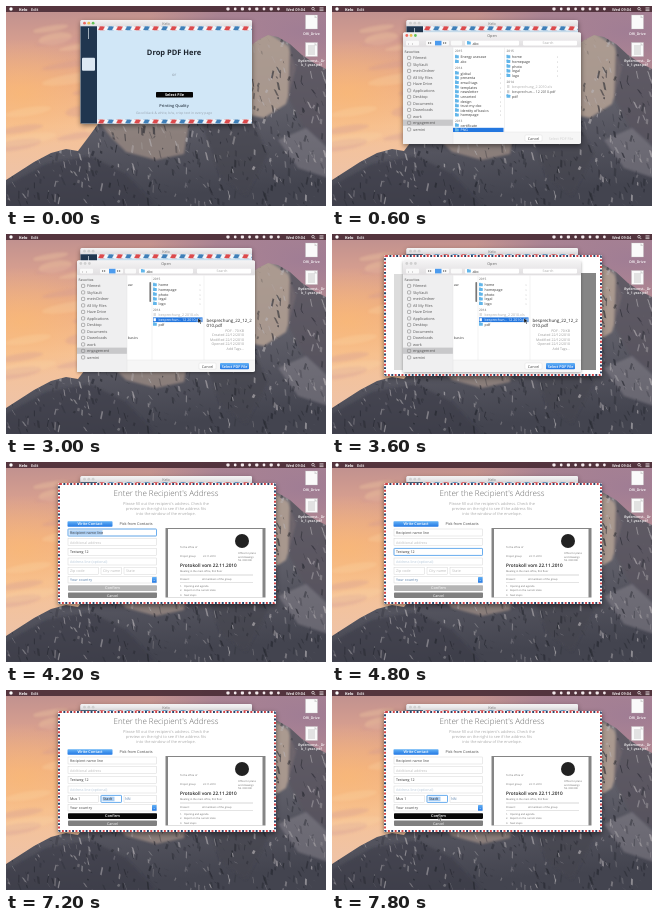
An HTML page for the animation above (8000 ms loop, 320 by 200 pixels).

```html
<!DOCTYPE html>
<html lang="en">
<head>
<meta charset="utf-8">
<title>Letter upload</title>
<style>
html, body { margin: 0; width: 100%; height: 100%; overflow: hidden; background: #a89ba2; }
svg { display: block; width: 100vw; height: 100vh; }
text { font-family: "Open Sans", "Noto Sans", sans-serif; text-rendering: geometricPrecision; white-space: pre; }
</style>
</head>
<body>
<svg id="stage" viewBox="0 0 320 200" xmlns="http://www.w3.org/2000/svg"></svg>
<script>
const LOOP = 8000;
const ACTIVE = ['#f0685e', '#f0bd4e', '#65c358'];
const IDLE = ['#d0d0d0', '#d0d0d0', '#d0d0d0'];
const stage = document.getElementById('stage');

// Drawing helpers
const rect = (x, y, w, h, fill, more = '') =>
  `<rect x="${x}" y="${y}" width="${w}" height="${h}" fill="${fill}" ${more}/>`;
const text = (x, y, size, str, fill = '#333', more = '') =>
  `<text x="${x}" y="${y}" font-size="${size}" fill="${fill}" ${more}>${str}</text>`;
const mid = (x, y, size, str, fill, more = '') =>
  text(x, y, size, str, fill, `text-anchor="middle" ${more}`);
const dot = (x, y, r, fill) => `<circle cx="${x}" cy="${y}" r="${r}" fill="${fill}"/>`;
const poly = (points, fill, more = '') => `<polygon points="${points}" fill="${fill}" ${more}/>`;
const line = (x1, y1, x2, y2, color, w = 0.4) =>
  `<path d="M${x1} ${y1}L${x2} ${y2}" stroke="${color}" stroke-width="${w}" fill="none"/>`;
const during = (from, to, body) => `<g data-from="${from}" data-to="${to}">${body}</g>`;
const lights = (x, y, colors) => colors.map((c, i) => dot(x + i * 4.3, y, 1.4, c)).join('');
const folder = (x, y) => rect(x, y - 3, 3.8, 3, '#62b6ea', 'rx=".4"') + rect(x, y - 3.5, 1.8, 1, '#62b6ea');
const pointer = (x, y) => `<path transform="translate(${x} ${y})" d="M0 0v5l1.3-1.2 1 2.2.8-.5-.9-2 1.6-.1z"
  fill="#111" stroke="#fff" stroke-width=".3"/>`;

function random(seed) {
  return () => (seed = (seed * 16807) % 2147483647) / 2147483647;
}

const defs = `<defs>
  <linearGradient id="sky" x2="0" y2="1">
    <stop offset="0" stop-color="#bd8f8f"/><stop offset=".2" stop-color="#d9a08f"/>
    <stop offset=".4" stop-color="#efb088"/><stop offset=".6" stop-color="#f6c296"/>
    <stop offset=".85" stop-color="#efc3a6"/></linearGradient>
  <radialGradient id="glow"><stop stop-color="#fbb971" stop-opacity=".65"/>
    <stop offset="1" stop-color="#fbb971" stop-opacity="0"/></radialGradient>
  <radialGradient id="mauve"><stop stop-color="#a07d94"/>
    <stop offset=".6" stop-color="#a07d94" stop-opacity=".75"/>
    <stop offset="1" stop-color="#a07d94" stop-opacity="0"/></radialGradient>
  <linearGradient id="rock" x2=".15" y2="1">
    <stop offset="0" stop-color="#8d8486"/><stop offset=".45" stop-color="#66656f"/>
    <stop offset="1" stop-color="#43444f"/></linearGradient>
  <linearGradient id="bar" x2="0" y2="1"><stop stop-color="#f4f3f4"/><stop offset="1" stop-color="#e0dee0"/></linearGradient>
  <linearGradient id="blue" x2="0" y2="1"><stop stop-color="#64b2f6"/><stop offset="1" stop-color="#2277e4"/></linearGradient>
  <pattern id="mail" width="18" height="4" patternUnits="userSpaceOnUse" x="92" y="20.3">
    <path d="M2 0h5l-2 4h-5z" fill="#dc4a4c"/><path d="M11 0h5l-2 4h-5z" fill="#3f7fb8"/></pattern>
  <clipPath id="cliff"><path d="M0 174L14 165 28 156 45 147 60 143 72 145 84 129 92 118 150 85 210 58 243 41
    252 34 262 29 272 31 284 38 296 49 308 57 320 63V200H0z"/></clipPath>
  <filter id="soft"><feGaussianBlur stdDeviation="1.1"/></filter>
  <filter id="shade" x="-15%" y="-15%" width="130%" height="130%"><feDropShadow dx="0" dy="2" stdDeviation="2.5" flood-opacity=".45"/></filter>
  <filter id="faint" x="-15%" y="-15%" width="130%" height="130%"><feDropShadow dx="0" dy="1" stdDeviation="1.5" flood-opacity=".35"/></filter>
</defs>`;

function wallpaper() {
  const rnd = random(41);
  let cracks = '';
  for (let i = 0; i < 850; i++) {
    const x = rnd() * 322, y = 30 + rnd() * 172;
    const h = 2 + rnd() * 7, w = 0.6 + rnd() * 1.8, lean = (rnd() - 0.35) * 5;
    const color = rnd() > 0.55 ? '#b9b5b8' : '#22242c';
    cracks += poly(`${x},${y} ${x + w},${y + 1} ${x + w + lean},${y + h} ${x + lean},${y + h - 1}`,
      color, `opacity="${0.2 + rnd() * 0.45}"`);
  }
  let clouds = '';
  for (let i = 0; i < 14; i++) {
    clouds += `<ellipse cx="${rnd() * 95}" cy="${18 + rnd() * 120}" rx="${14 + rnd() * 23}" ry="${2 + rnd() * 4}"
      fill="${i % 2 ? '#fcd6a6' : '#cb9492'}" opacity=".28" transform="rotate(-9 40 80)"/>`;
  }
  return rect(0, 0, 320, 200, 'url(#sky)')
    + '<ellipse cx="15" cy="88" rx="85" ry="55" fill="url(#glow)"/>'
    + '<ellipse cx="300" cy="25" rx="160" ry="65" fill="url(#mauve)"/>'
    + `<g filter="url(#soft)">${clouds}</g>`
    + '<g clip-path="url(#cliff)">' + rect(0, 20, 320, 180, 'url(#rock)')
    + '<g filter="url(#soft)">'
    + poly('240,40 262,27 282,40 290,62 280,98 258,112 238,108', '#b4a194', 'opacity=".85"')
    + poly('284,36 322,60 322,140 296,120 282,92', '#5a5560', 'opacity=".75"')
    + poly('92,114 184,112 178,148 150,154 120,146 104,130', '#998a83', 'opacity=".8"')
    + poly('195,116 245,112 262,148 240,190 214,170', '#45464f', 'opacity=".65"')
    + poly('0,180 40,158 84,150 120,168 150,200 0,200', '#3b3d49', 'opacity=".6"')
    + poly('272,134 300,122 322,142 322,172 292,162', '#85818a', 'opacity=".55"')
    + `</g>${cracks}</g>`;
}

function desktop() {
  const paper = y => rect(299.5, y, 12, 14, '#fafafa', 'stroke="#bbb" stroke-width=".3"')
    + poly(`308.5,${y} 311.5,${y + 3} 308.5,${y + 3}`, '#d5d5d5');
  let rows = '';
  for (let i = 0; i < 5; i++) rows += line(302, 40 + i * 2, 309, 40 + i * 2, '#999', 0.5);
  const label = (y, s) => mid(305.5, y, 3.5, s, '#fff', 'font-weight="600"');
  const menu = (x, s, weight) => text(x, 4.5, 3.9, s, '#fff', `font-weight="${weight}"`);
  let status = '';
  for (let i = 0; i < 8; i++) {
    const x = 222 + i * 7.2;
    status += i % 2 ? dot(x, 3, 1.4, '#f3e9ec') : rect(x - 1.6, 1.6, 3.2, 2.8, '#f3e9ec', 'rx=".8"');
  }
  return rect(0, 0, 320, 6, '#4d2f39', 'opacity=".93"') + dot(5, 3, 1.7, '#fff')
    + menu(13, 'Kelo', 700) + menu(25, 'Edit', 600) + status + menu(280, 'Wed 09:04', 600)
    + '<circle cx="307" cy="2.7" r="1.3" fill="none" stroke="#fff" stroke-width=".6"/>' + line(308, 3.7, 309.3, 5, '#fff', 0.6)
    + [1.8, 3.2, 4.6].map(y => line(313.5, y, 317.5, y, '#fff', 0.6)).join('')
    + paper(9) + label(28.5, 'DRI_Drive') + paper(36.5) + rows
    + label(56, 'Bydemonst.._Dr') + label(60.3, 'k_1.year.pdf');
}

function appWindow() {
  const stripes = rect(91, 20.3, 155, 4, '#f3f5f8') + rect(91, 20.3, 155, 4, 'url(#mail)');
  return `<g filter="url(#shade)">${rect(74.5, 14, 171.5, 103.5, '#d1e7f7', 'rx="1.8"')}</g>`
    + rect(74.5, 14, 171.5, 6.3, 'url(#bar)', 'rx="1.5"')
    + during(0, 600, lights(78.5, 17.2, ACTIVE)) + during(600, LOOP, lights(78.5, 17.2, IDLE))
    + mid(160, 18.6, 3.8, 'Kelo', '#777')
    + rect(74.5, 20.3, 16.5, 97.2, '#20364f') + line(82.5, 22, 82.5, 33, '#dce5ed', 0.7)
    + rect(76, 51.8, 13, 13, '#dce8f3', 'rx="1"')
    + stripes + `<g transform="translate(0 93.2)">${stripes}</g>`
    + mid(168, 49, 7.5, 'Drop PDF Here', '#1c242d', 'font-weight="700"') + mid(168, 70, 4.2, 'or', '#8d98a4')
    + rect(150, 86, 37, 5.6, '#050505', 'rx=".8"') + mid(168.5, 90.2, 3.8, 'Select File', '#fff', 'font-weight="700"')
    + mid(168, 101.4, 3.9, 'Printing Quality', '#33404e', 'font-weight="600"')
    + mid(168, 108, 3.4, 'Good black &amp; white, b/w, crisp text in every page', '#97a3af');
}

function dialogFrame(shadow, colors) {
  const places = ['Filenest', 'SkyVault', 'meinOrdner', 'All My Files', 'Haze Drive', 'Applications',
    'Desktop', 'Documents', 'Downloads', 'work', 'engagement', 'uemini'];
  let side = text(72.5, 47.3, 3.4, 'Favorites', '#666', 'font-weight="600"') + rect(71, 113.6, 50, 6.2, '#c8c8ca');
  places.forEach((name, i) => {
    const y = 53.4 + i * 6.5;
    side += rect(75.5, y - 3.1, 3.2, 3.2, 'none', 'rx=".7" stroke="#888" stroke-width=".6"') + text(81, y, 3.8, name, '#555');
  });
  return `<g filter="url(#${shadow})">${rect(71, 26.5, 178, 111.5, '#f6f6f6', 'rx="1.8"')}</g>`
    + rect(71, 26.5, 178, 15, 'url(#bar)', 'rx="1.5"') + lights(74.8, 29.5, colors) + mid(160, 30.7, 3.8, 'Open', '#666')
    + rect(71, 41.5, 50, 96.5, '#efeff0') + rect(121, 41.5, 128, 84.5, '#fff')
    + rect(74, 34.8, 13, 4.6, '#fafafa', 'rx=".8"') + text(76, 38.5, 3.8, '‹   ›', '#666')
    + rect(94, 34.8, 23, 4.6, '#fafafa', 'rx=".8"') + rect(103, 34.8, 6.5, 4.6, '#4c9bee')
    + [96, 98, 111, 113].map(x => rect(x, 36, 1.2, 2, '#999')).join('')
    + rect(119, 34.8, 11, 4.6, '#fafafa', 'rx=".8"')
    + rect(133, 34.8, 54, 4.6, '#fff', 'rx=".8"') + folder(135, 38.6) + text(140.5, 38.5, 3.8, 'abc', '#333')
    + rect(191, 34.8, 54, 4.6, '#fff', 'rx=".8"') + mid(216, 38.4, 3.5, 'Search', '#aaa')
    + side + line(121, 41.5, 121, 138, '#ddd') + line(121, 126, 249, 126, '#ddd')
    + rect(193, 129, 17, 6.2, '#fff', 'rx="1" stroke="#ccc" stroke-width=".3"') + mid(201.5, 133.5, 3.7, 'Cancel', '#444');
}

const list = (x, y, step, names) => names.map((n, i) =>
  folder(x, y + i * step) + text(x + 5.5, y + i * step, 3.6, n, '#333')).join('');
const head = (x, y, s) => text(x, y, 3.2, s, '#888', 'font-weight="600"');
const arrow = (x, y) => text(x, y, 3.5, '›', '#888');
const disabledSelect = mid(229, 133.5, 3.7, 'Select PDF File', '#d0d0d0');

function files(x, right, picked) {
  const folders = ['home', 'homepage', 'photo', 'legal', 'logo'];
  return head(x, 46.4, '2015') + list(x, 52.3, 4.7, folders)
    + folders.map((n, i) => arrow(right - 3, 52.3 + i * 4.7)).join('')
    + head(x, 77.3, '2014') + rect(x + 0.5, 79, 2.4, 3, '#ddd') + text(x + 5.5, 82.4, 3.6, 'besprechung_2 2010.xls', '#aaa')
    + (picked ? rect(x, 83.4, right - x, 4.7, '#2477df') : '')
    + rect(x + 0.5, 84.2, 2.4, 3, picked ? '#fff' : '#ccc')
    + text(x + 5.5, 87, 3.6, 'besprechun... 12 2010.pdf', picked ? '#fff' : '#555')
    + list(x, 91.8, 5, ['pdf']);
}

function browsing() {
  const names = ['global', 'presenta', 'email tags', 'templates', 'newsletter', 'unsorted', 'design',
    'trust my doc', 'identity of basics', 'homepage'];
  return head(123, 46.4, '2015') + list(123, 52.3, 4.8, ['Energy usecase', 'abc'])
    + head(123, 62.7, '2014') + list(123, 68.6, 4.65, names)
    + names.map((n, i) => arrow(168, 68.6 + i * 4.65)).join('')
    + head(123, 115.5, '2013') + list(123, 120.8, 5, ['certificate'])
    + rect(121, 121.8, 50.5, 4.2, '#2477df') + folder(123, 125.4) + text(128.5, 125.3, 3.6, 'PNG', '#fff')
    + line(172.5, 41.5, 172.5, 126, '#ddd') + files(174.5, 228, false) + disabledSelect;
}

function narrowed(picked) {
  return line(146, 41.5, 146, 126, '#ddd') + line(198, 41.5, 198, 126, '#ddd')
    + text(121.8, 52, 3.6, 'aw', '#444') + text(121.8, 105, 3.6, 'basics', '#444')
    + rect(143.4, 48, 1.7, 20, '#777', 'rx=".8"') + files(147, 196.5, picked)
    + (picked ? '' : disabledSelect);
}

function preview() {
  const info = ['PDF - 70 KB', 'Created 22/12/2010', 'Modified 22/12/2010', 'Opened 22/12/2010', 'Add Tags...'];
  return text(200.5, 87.6, 4.4, 'besprechung_22_12_2', '#222') + text(200.5, 93, 4.4, '010.pdf', '#222')
    + info.map((s, i) => text(238, 98 + i * 4.4, 3.5, s, '#999', 'text-anchor="end"')).join('')
    + rect(214, 129, 29, 6.2, 'url(#blue)', 'rx="1"') + mid(228.5, 133.5, 3.7, 'Select PDF File', '#fff', 'font-weight="600"')
    + pointer(192, 84);
}

function sheet() {
  const edge = (color, offset) =>
    `<rect x="53" y="22" width="216" height="119" rx="1" fill="none" stroke="${color}" stroke-width="2" stroke-dasharray="1.9 4.9" stroke-dashoffset="${offset}"/>`;
  return `<g filter="url(#shade)">${rect(52, 21, 218, 121, '#fff', 'rx="1"')}</g>` + edge('#cf4146', 0) + edge('#27456b', 3.4);
}

const field = (y, str, fill, x = 62, w = 88.5) =>
  rect(x, y, w, 7, '#fff', 'stroke="#ccc" stroke-width=".4"') + text(x + 2, y + 4.8, 3.6, str, fill);
const ring = (x, y, w) => rect(x, y, w, 7, 'none', 'rx=".6" stroke="#6aaef0" stroke-width="1"');

function page() {
  const small = (x, y, s) => text(x, y, 2.5, s, '#666');
  return rect(159.5, 66, 100, 69.5, '#858585') + rect(162, 67, 94.5, 68.5, '#fff')
    + dot(236, 79, 7, '#222')
    + small(232, 92, 'Office for plans') + small(232, 95.5, 'and drawings') + small(232, 99, 'Tel. 000 000')
    + small(174, 86, 'To the office of') + small(174, 94.5, 'Project group') + small(197, 94.5, '22.11.2010')
    + text(174, 105, 4.7, 'Protokoll vom 22.11.2010', '#222', 'font-weight="600"')
    + small(174, 110, 'Meeting in the main office, first floor')
    + line(174, 113, 247, 113, '#999') + small(174, 117.5, 'Present:') + small(196, 117.5, 'all members of the group')
    + line(174, 120.5, 247, 120.5, '#bbb') + small(174, 125, '1.   Opening and agenda')
    + small(174, 129, '2.   Report on the current state') + small(174, 133.6, '3.   Next steps');
}

function form() {
  const help = ['Please fill out the recipient\'s address. Check the',
    'preview on the right to see if the address fits', 'into the window of the envelope.'];
  return mid(160, 34, 8, 'Enter the Recipient\'s Address', '#666', 'font-weight="300"')
    + help.map((s, i) => mid(160, 42.5 + i * 5.2, 3.9, s, '#aaa')).join('')
    + rect(61.5, 59.2, 45, 5.6, 'url(#blue)', 'rx=".8"') + mid(84, 63.4, 3.8, 'Write Contact', '#fff', 'font-weight="600"')
    + text(113.5, 63.4, 3.8, 'Pick from Contacts', '#444')
    + field(67, 'Recipient name line', '#444') + field(76.7, 'Additional address', '#bbb')
    + field(86.4, 'Testweg 12', '#333') + field(96, 'Address line (optional)', '#b5c7d8')
    + field(105.4, '', '#444', 62, 30.5) + field(105.4, '', '#444', 95, 20.5) + field(105.4, '', '#444', 118, 32.5)
    + rect(62, 114.7, 88.5, 6.3, '#fff', 'stroke="#ccc" stroke-width=".4"')
    + rect(146, 114.9, 4.6, 5.9, 'url(#blue)', 'rx=".6"') + mid(148.3, 119.3, 3.5, '⌄', '#fff')
    + rect(62, 130.6, 89, 5.3, '#808080', 'rx=".8"') + mid(106.5, 134.6, 3.6, 'Cancel', '#fff') + page();
}

const confirm = (bg, fill) => rect(62, 123.2, 89, 5.7, bg, 'rx=".8"') + mid(106.5, 127.4, 3.8, 'Confirm', fill, 'font-weight="600"');
const entry = (x, str, fill) => text(x, 110.3, 3.7, str, fill);

function formStates() {
  return during(4200, 4800, ring(62, 67, 88.5) + rect(63.5, 68.3, 33, 4.5, '#a9cdf3') + text(64, 71.8, 3.6, 'Recipient name line', '#444'))
    + during(4800, 5400, ring(62, 86.4, 88.5))
    + during(4200, 6000, entry(64, 'Zip code', '#bbb'))
    + during(4200, 6600, entry(97, 'City name', '#bbb') + entry(120, 'State', '#bbb')
      + text(64, 119.2, 3.7, 'Your country', '#5c83ad') + confirm('#b5b5b5', '#eee'))
    + during(5400, 6600, ring(62, 105.4, 30.5))
    + during(6000, 6600, entry(64, 'Musf', '#333') + line(73.7, 107, 73.7, 111, '#333'))
    + during(6600, LOOP, entry(64, 'Mus 1', '#333') + ring(95, 105.4, 20.5) + rect(96.5, 106.7, 12, 4.5, '#a9cdf3')
      + entry(97, 'Stadt', '#333') + entry(119, 'NN', '#5c83ad') + text(64, 119.2, 3.7, 'Your country', '#444') + confirm('#080808', '#fff'))
    + during(7800, LOOP, pointer(106, 125));
}

stage.innerHTML = defs + wallpaper() + desktop() + appWindow()
  + during(3600, LOOP, sheet())
  + during(3600, 4200, rect(239, 39, 25, 97, '#858585') + rect(62, 40, 9, 96, '#dcdcdc'))
  + during(600, 3000, dialogFrame('shade', ACTIVE))
  + during(3000, 4200, dialogFrame('faint', IDLE))
  + during(600, 1200, browsing())
  + during(1200, 1800, narrowed(false))
  + during(1800, 4200, narrowed(true) + preview())
  + during(4200, LOOP, form() + formStates());

const layers = [...stage.querySelectorAll('[data-from]')].map(el => ({ el, from: +el.dataset.from, to: +el.dataset.to }));

function render() {
  const t = performance.now() % LOOP;
  for (const { el, from, to } of layers) el.style.display = t >= from && t < to ? '' : 'none';
  requestAnimationFrame(render);
}
render();
</script>
</body>
</html>
```
